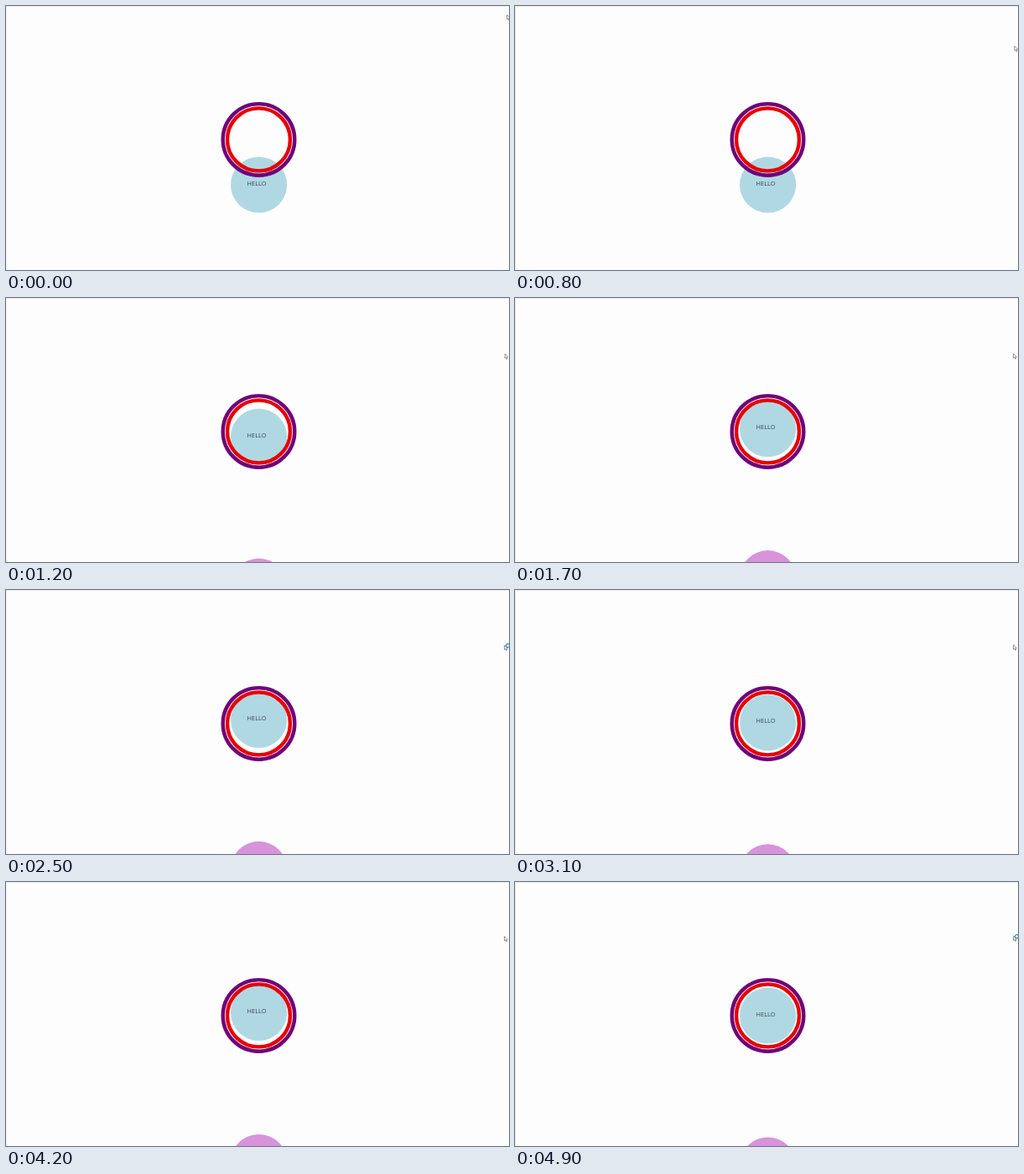
An HTML page for the animation above (5 s loop, 600 px wide and 316 px high).

```html
<!DOCTYPE html>
<html>
<head>
<meta charset="utf-8">
<style>
  html, body { margin: 0; height: 100%; overflow: hidden; background: #fdfdfe; }
  svg { display: block; width: 600px; height: 316px; }
  text { font: 7.4px "Open Sans", "Noto Sans", sans-serif; fill: #34464c; }
</style>
</head>
<body>
<svg viewBox="0 0 600 316">
  <path d="M.5 316V.5H600" fill="none" stroke="#ebebeb"/>
  <g id="page">
    <circle cx="301.6" r="33.6" fill="#b0d8e3"/>
    <text x="299" y=".7" text-anchor="middle">HELLO</text>
    <circle cx="301.6" cy="179.1" r="33.6" fill="#d893da"/>
  </g>
  <g fill="none" stroke-width="4.4">
    <circle cx="301.5" cy="159.9" r="42.8" stroke="#700078"/>
    <circle cx="301.5" cy="159.9" r="37.5" stroke="#e60004"/>
  </g>
  <g id="cursor">
    <path d="M.5.5V6L1.8 4.9 2.8 7 3.6 6.6 2.7 4.6H4.3Z" fill="#fff" stroke="#555" stroke-width=".6"/>
    <circle id="busy" cx="4.6" cy="1" r="2.1" fill="none" stroke="#2a8fd0" stroke-width="1.2"/>
  </g>
</svg>
<script>
const LOOP = 5000, STEP = 100;
const START_Y = 214, GLIDE_Y = 155.3, SNAP_Y = 160;
const $ = id => document.getElementById(id);

const progress = (t, from, to) => Math.min(1, Math.max(0, (t - from) / (to - from)));
const smooth = p => p * p * (3 - 2 * p);

// Scroll glides past the snap point, settles back, then dips once more.
function ballY(t) {
  const glide = Math.exp(-Math.max(0, t - 800) / 237);
  const settle = smooth(progress(t, 2700, 3300));
  const dip = .85 * Math.sin(Math.PI * progress(t, 3600, 4600)) ** 2;
  return GLIDE_Y + (START_Y - GLIDE_Y) * glide + (SNAP_Y - GLIDE_Y) * (settle - dip);
}

// The pointer speeds downwards, then rests with a slow drift.
const cursorX = t => Math.max(594, 597 - .002 * t);
const cursorY = t => Math.min(67 - .0006 * t, 10 + 50 * (t / 1000) ** 1.29);
const isBusy = t => t >= 2300 && t < 2800 || t >= 4800;

function move(id, x, y) {
  $(id).setAttribute("transform", `translate(${x} ${y})`);
}

function draw(now) {
  const t = Math.floor(now % LOOP / STEP) * STEP;
  move("page", 0, ballY(t));
  move("cursor", cursorX(t), cursorY(t));
  $("busy").setAttribute("visibility", isBusy(t) ? "visible" : "hidden");
  requestAnimationFrame(draw);
}
draw(performance.now());
</script>
</body>
</html>
```
